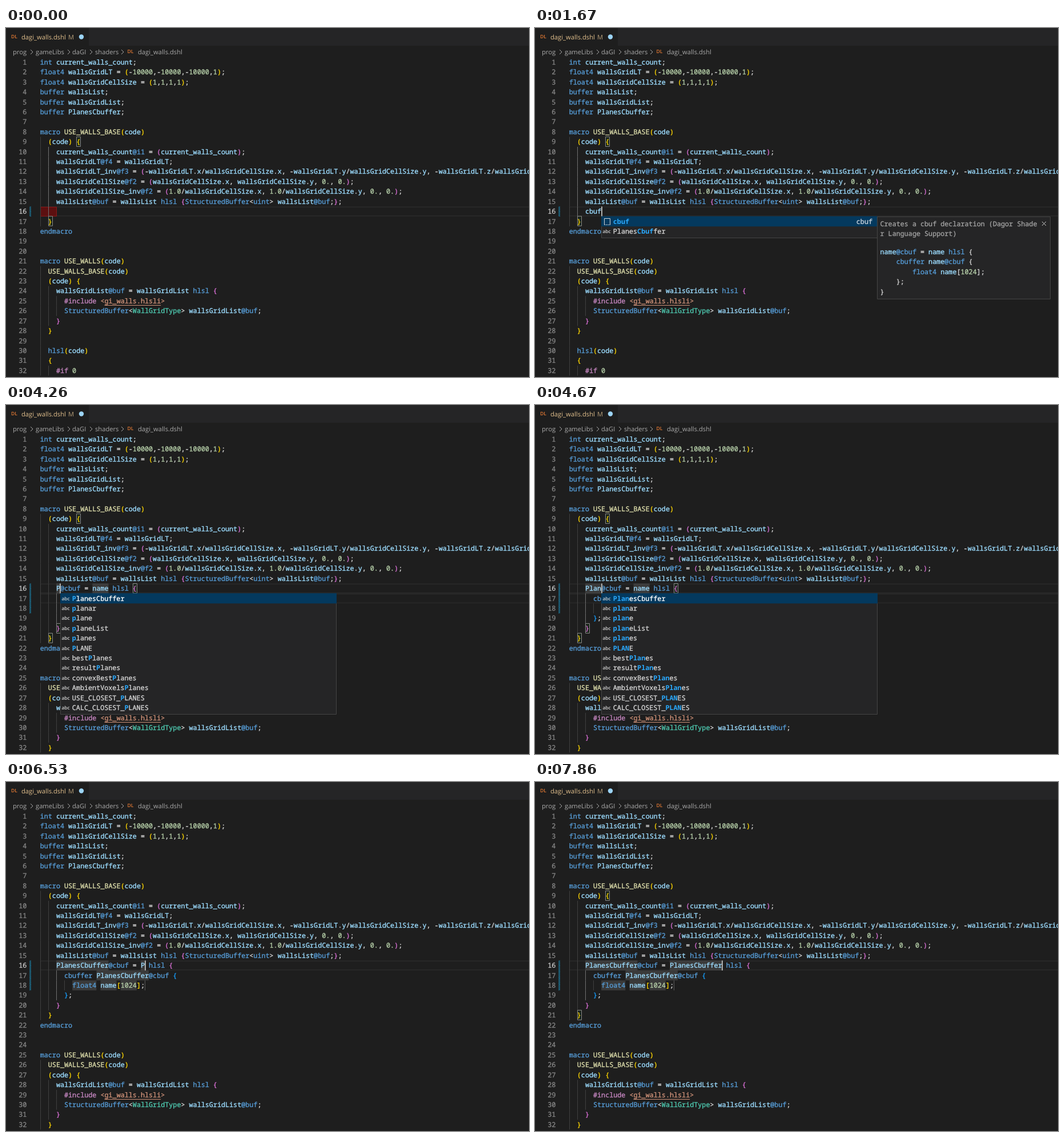
These frames come from a looping animation (916 px wide and 611 px high, 8 s). An HTML page with a canvas:

```html
<!DOCTYPE html>
<html lang="en">
<head>
<meta charset="utf-8">
<title>Shader snippet completion</title>
<style>
  html, body { margin: 0; width: 100%; height: 100%; overflow: hidden; background: #1e1e1e; }
  canvas { display: block; }
</style>
</head>
<body>
<canvas id="stage" width="916" height="611"></canvas>
<script>
const ctx = document.getElementById('stage').getContext('2d');
const W = 916, H = 611, LOOP = 8000;
const X0 = 59.7, CW = 7.05, Y0 = 51.25, LH = 17.417, ROWS = 32;
const MONO = '11.75px "Noto Sans Mono", "DejaVu Sans Mono", monospace';
const UI = '11.2px "Open Sans", "Noto Sans", sans-serif';
const BLUE = '#569cd6', LIGHT = '#9cdcfe', PLAIN = '#d4d4d4', STRING = '#ce9178';
const BRACKETS = ['#ffd700', '#da70d6', '#179fff'];
const KEYWORDS = new Set('int float4 buffer macro endmacro hlsl cbuffer uint StructuredBuffer'.split(' '));

const HEAD = `int current_walls_count;
float4 wallsGridLT = (-10000,-10000,-10000,1);
float4 wallsGridCellSize = (1,1,1,1);
buffer wallsList;
buffer wallsGridList;
buffer PlanesCbuffer;

macro USE_WALLS_BASE(code)
  (code) {
    current_walls_count@i1 = (current_walls_count);
    wallsGridLT@f4 = wallsGridLT;
    wallsGridLT_inv@f3 = (-wallsGridLT.x/wallsGridCellSize.x, -wallsGridLT.y/wallsGridCellSize.y, -wallsGridLT.z/wallsGridCellSize.z);
    wallsGridCellSize@f2 = (wallsGridCellSize.x, wallsGridCellSize.y, 0., 0.);
    wallsGridCellSize_inv@f2 = (1.0/wallsGridCellSize.x, 1.0/wallsGridCellSize.y, 0., 0.);
    wallsList@buf = wallsList hlsl {StructuredBuffer<uint> wallsList@buf;};`.split('\n');

const TAIL = `  }
endmacro


macro USE_WALLS(code)
  USE_WALLS_BASE(code)
  (code) {
    wallsGridList@buf = wallsGridList hlsl {
      #include <gi_walls.hlsli>
      StructuredBuffer<WallGridType> wallsGridList@buf;
    }
  }
  
  hlsl(code)
  {
    #if 0`.split('\n');

const DOC = `name@cbuf = name hlsl {
    cbuffer name@cbuf {
        float4 name[1024];
    };
}`.split('\n');

const C_WORDS = ['code', 'cell', 'color', 'coord', 'count', 'center', 'cascade', 'closest', 'cbuffer',
  'current_walls_count', 'convexBestPlanes', 'CALC_CLOSEST_PLANES'];
const PLANE_WORDS = ['PlanesCbuffer', 'planar', 'plane', 'planeList', 'planes', 'PLANE', 'bestPlanes', 'resultPlanes',
  'convexBestPlanes', 'AmbientVoxelsPlanes', 'USE_CLOSEST_PLANES', 'CALC_CLOSEST_PLANES'];

// Each step changes part of the editor state at its time in ms.
const STEPS = [
  [0, { typed: '', caret: 0, popup: 0, snippet: 0, pairs: 'o', marks: 1, sel: 0, stop: 1 }],
  [200, { caret: 1 }], [670, { caret: 0 }],
  [1070, { typed: 'c', caret: 1 }], [1140, { popup: 1 }],
  [1340, { typed: 'cb' }], [1470, { typed: 'cbu' }], [1670, { typed: 'cbuf' }],
  [2130, { caret: 0 }], [2660, { caret: 1 }], [3130, { caret: 0 }],
  [3530, { snippet: 1, first: 'name', second: 'name', sel: 1, popup: 0, caret: 1 }],
  [3600, { pairs: '' }], [3730, { pairs: 'oi', marks: 3 }], [4060, { caret: 0 }],
  [4200, { first: 'P', sel: 0, caret: 1, pairs: '' }], [4260, { popup: 1, pairs: 'oi' }],
  [4400, { first: 'Pl' }], [4470, { first: 'Pla' }], [4670, { first: 'Plan' }], [4800, { first: 'Plane' }],
  [5130, { first: 'PlanesCbuffer', popup: 0 }], [5660, { caret: 0 }],
  [5930, { stop: 2, sel: 1, caret: 1, pairs: '' }], [6000, { pairs: 'o' }], [6460, { caret: 0 }],
  [6530, { second: 'P', sel: 0, caret: 1, pairs: '' }], [6600, { popup: 1, pairs: 'o' }],
  [6730, { second: 'Pl' }], [6860, { second: 'Pla' }], [7060, { second: 'Plan' }], [7590, { caret: 0 }],
  [7790, { second: 'PlanesCbuffer', popup: 0, caret: 1 }]
];

const colX = col => X0 + col * CW;
const rowY = row => Y0 + (row - 1) * LH;
const baseline = row => Math.round(rowY(row) + 12.6);

function rect(x, y, w, h, color) {
  ctx.fillStyle = color;
  ctx.fillRect(x, y, w, h);
}
function frame(x, y, w, h, color) {
  ctx.strokeStyle = color;
  ctx.lineWidth = 1;
  ctx.strokeRect(x + 0.5, y + 0.5, w - 1, h - 1);
}
function text(str, x, y, color, font = MONO) {
  ctx.font = font;
  ctx.fillStyle = color;
  ctx.fillText(str, x, y);
}
// Code is drawn with a hairline outline to give it a medium weight.
function code(str, x, y, color) {
  text(str, x, y, color);
  ctx.strokeStyle = color;
  ctx.lineWidth = 0.35;
  ctx.strokeText(str, x, y);
}
function path(points, color, width = 1) {
  ctx.strokeStyle = color;
  ctx.lineWidth = width;
  ctx.beginPath();
  points.forEach(([x, y]) => ctx.lineTo(x, y));
  ctx.stroke();
}
function panel(x, y, w, h) {
  rect(x, y, w, h, '#252526');
  frame(x, y, w, h, '#454545');
}

function tokenColor(token) {
  if (token[0] === '#') return '#c586c0';
  if (token[0] === '@' || KEYWORDS.has(token)) return BLUE;
  if (/^<./.test(token)) return STRING;
  if (/^\d/.test(token)) return '#b5cea8';
  if (/^USE_/.test(token)) return '#dcdcaa';
  if (token === 'WallGridType') return '#4ec9b0';
  return /^\w/.test(token) ? LIGHT : PLAIN;
}

// Draws one line of code and returns the bracket depth after it.
function codeLine(line, x, y, depth) {
  for (const match of line.matchAll(/#\w+|<[\w.]+\.hlsli>|@\w+|\d+\.?\d*|\w+|\S/g)) {
    const token = match[0], tx = x + match.index * CW;
    let color = tokenColor(token);
    if (depth !== null && '({['.includes(token)) color = BRACKETS[depth++ % 3];
    else if (depth !== null && ')}]'.includes(token)) color = BRACKETS[--depth % 3];
    code(token, tx, y, color);
    if (color === STRING) rect(tx + CW, y + 3, (token.length - 2) * CW, 1, STRING);
  }
  return depth;
}

function drawHeader() {
  rect(145, 0, W - 145, 31, '#252526');
  const small = '600 8.5px "Open Sans", sans-serif';
  text('DL', 9, 18, '#e37933', small);
  text('dagi_walls.dshl', 27, 20, '#e2c08d', UI);
  text('M', 109, 20, '#b39b76', UI);
  ctx.fillStyle = '#9cd4f5';
  ctx.beginPath();
  ctx.arc(132, 15.5, 4.2, 0, 7);
  ctx.fill();

  const grey = '#a9a9a9';
  [['prog', 12], ['gameLibs', 52], ['daGI', 116], ['shaders', 156], ['dagi_walls.dshl', 231]]
    .forEach(([name, x]) => text(name, x, 46, grey, UI));
  text('DL', 212.5, 44, '#e37933', small);
  for (const x of [43, 108, 147, 202]) path([[x, 38], [x + 4, 42], [x, 46]], grey);
}

function snippetLines(s) {
  return [
    `    ${s.first}@cbuf = ${s.second} hlsl {`,
    `      cbuffer ${s.first}@cbuf {`,
    '        float4 name[1024];', '      };', '    }'
  ];
}

function drawCurrentRow(row) {
  rect(X0, rowY(row), W, 1.8, '#282828');
  rect(X0, rowY(row + 1) - 1.8, W, 1.8, '#282828');
}

function drawGuides(lines, s) {
  const [activeCol, from, to] = s.snippet ? [4, 17, 19] : [2, 10, 16];
  lines.forEach((line, i) => {
    const indent = line.match(/^ */)[0].length, row = i + 1;
    for (let col = 0; col < indent; col += 2) {
      const active = col === activeCol && row >= from && row <= to;
      rect(Math.round(colX(col)), rowY(row), 1, LH, active ? '#707070' : '#404040');
    }
  });
}

function drawPlaceholders(s, secondCol) {
  const mark = (row, col, length, color = 'rgba(124,124,124,.3)') =>
    rect(colX(col), rowY(row), length * CW, LH, color);
  if (s.sel) {
    const blue = '#264f78';
    if (s.stop === 1) {
      mark(16, 4, s.first.length, blue);
      mark(17, 14, s.first.length, blue);
    } else mark(16, secondCol, s.second.length, blue);
  }
  mark(16, 4, s.first.length);
  mark(16, secondCol, s.second.length);
  mark(17, 14, s.first.length);
  mark(18, 8, 6);
  mark(18, 15, 4);
  mark(18, 20, 4);
  rect(Math.floor(colX(26)), rowY(18), 1, LH, '#5a5a5a');
}

function drawGutterMark(rows) {
  ctx.save();
  ctx.beginPath();
  ctx.rect(41, rowY(16), 3, rows * LH);
  ctx.clip();
  for (let y = rowY(16); y < rowY(16 + rows) + 4; y += 2.75) path([[40, y + 1], [45, y - 4]], '#1b81a8', 1.2);
  ctx.restore();
}

function drawPairs(s, braceCol) {
  const box = (row, col) => {
    const x = Math.round(colX(col)), y = Math.floor(rowY(row));
    rect(x, y, 8, 18, 'rgba(0,100,0,.1)');
    frame(x, y, 8, 18, '#888888');
  };
  if (s.pairs.includes('o')) {
    box(9, 9);
    box(s.snippet ? 21 : 17, 2);
  }
  if (s.pairs.includes('i')) {
    box(16, braceCol);
    box(20, 4);
  }
}

function suggestions(prefix) {
  if (prefix === 'c') return C_WORDS;
  if (prefix[0] === 'c') return ['cbuf', 'PlanesCbuffer'];
  return PLANE_WORDS.filter(word => word.toLowerCase().includes(prefix.toLowerCase()));
}

function drawPopup(prefix, col) {
  const items = suggestions(prefix), x = Math.round(colX(col)), y = 330, width = 484;
  panel(x, y, width, Math.round(items.length * LH + 3));
  rect(x, y - 0.5, width, LH + 0.5, '#04395e');
  items.forEach((word, i) => {
    const base = baseline(17 + i), left = x + 20.8;
    const start = word.toLowerCase().indexOf(prefix.toLowerCase()), end = start + prefix.length;
    const color = i ? PLAIN : '#ffffff';
    if (word === 'cbuf') {
      frame(x + 5, y + 3, 11, 12, '#d4d4d4');
      for (let d = 0; d < 3; d++) rect(x + 7 + d * 3, y + 14, 1, 1, '#04395e');
      code(word, x + width - 9 - 4 * CW, base, '#c8d3dc');
    } else text('abc', x + 2.5, base - 1, '#d4d4d4', '600 8.4px "Open Sans", sans-serif');
    code(word.slice(0, start), left, base, color);
    text(word.slice(start, end), left + start * CW, base, '#2aaaff', 'bold ' + MONO);
    code(word.slice(end), left + end * CW, base, color);
  });
  if (items[0] === 'cbuf') drawDetails(x + width - 1, y);
}

function drawDetails(x, y) {
  const left = x + 5.5, grey = '#a0a0a0';
  panel(x, y, 304, 145);
  code('Creates a cbuf declaration (Dagor Shade', left, y + 16.5, grey);
  code('r Language Support)', left, y + 34, grey);
  path([[x + 289, y + 9], [x + 296, y + 16]], '#d0d0d0');
  path([[x + 296, y + 9], [x + 289, y + 16]], '#d0d0d0');
  DOC.forEach((line, i) => codeLine(line, left, Math.round(y + 66 + i * LH), null));
}

function drawCaret(row, col) {
  rect(Math.round(colX(col) - 0.5), rowY(row), 2, LH, '#aeafad');
}

function draw(s) {
  const secondCol = s.snippet ? 4 + s.first.length + 8 : 0;
  const word = !s.snippet ? s.typed : s.stop === 1 ? s.first : s.second;
  const caretCol = (s.stop === 1 ? 4 : secondCol) + word.length;
  const bothCarets = s.snippet && s.stop === 1;
  const middle = s.snippet ? snippetLines(s) : ['    ' + s.typed];
  const lines = [...HEAD, ...middle, ...TAIL].slice(0, ROWS);

  rect(0, 0, W, H, '#1e1e1e');
  drawHeader();
  if (!s.sel) {
    drawCurrentRow(16);
    if (bothCarets) drawCurrentRow(17);
  }
  if (!s.snippet && !s.typed) {
    rect(60, 313, 29, 17, '#5c1010');
    frame(60, 313, 29, 17, '#8a1a1a');
  }
  if (s.snippet) drawPlaceholders(s, secondCol);
  drawGuides(lines, s);
  drawPairs(s, secondCol + (s.second || '').length + 6);

  let depth = 0;
  lines.forEach((line, i) => {
    const row = i + 1, label = String(row);
    code(label, 36.3 - label.length * CW, baseline(row), row === 16 ? '#c6c6c6' : '#858585');
    depth = codeLine(line, X0, baseline(row), depth);
  });
  drawGutterMark(s.marks);

  if (s.caret) {
    drawCaret(16, caretCol);
    if (bothCarets) drawCaret(17, 14 + word.length);
  }
  if (s.popup) drawPopup(word, caretCol);
}

ctx.textRendering = 'geometricPrecision';
ctx.lineJoin = 'round';
const startTime = performance.now();
function tick() {
  const t = (performance.now() - startTime) % LOOP;
  draw(Object.assign({}, ...STEPS.filter(([at]) => at <= t).map(([, change]) => change)));
  requestAnimationFrame(tick);
}
tick();
</script>
</body>
</html>
```
